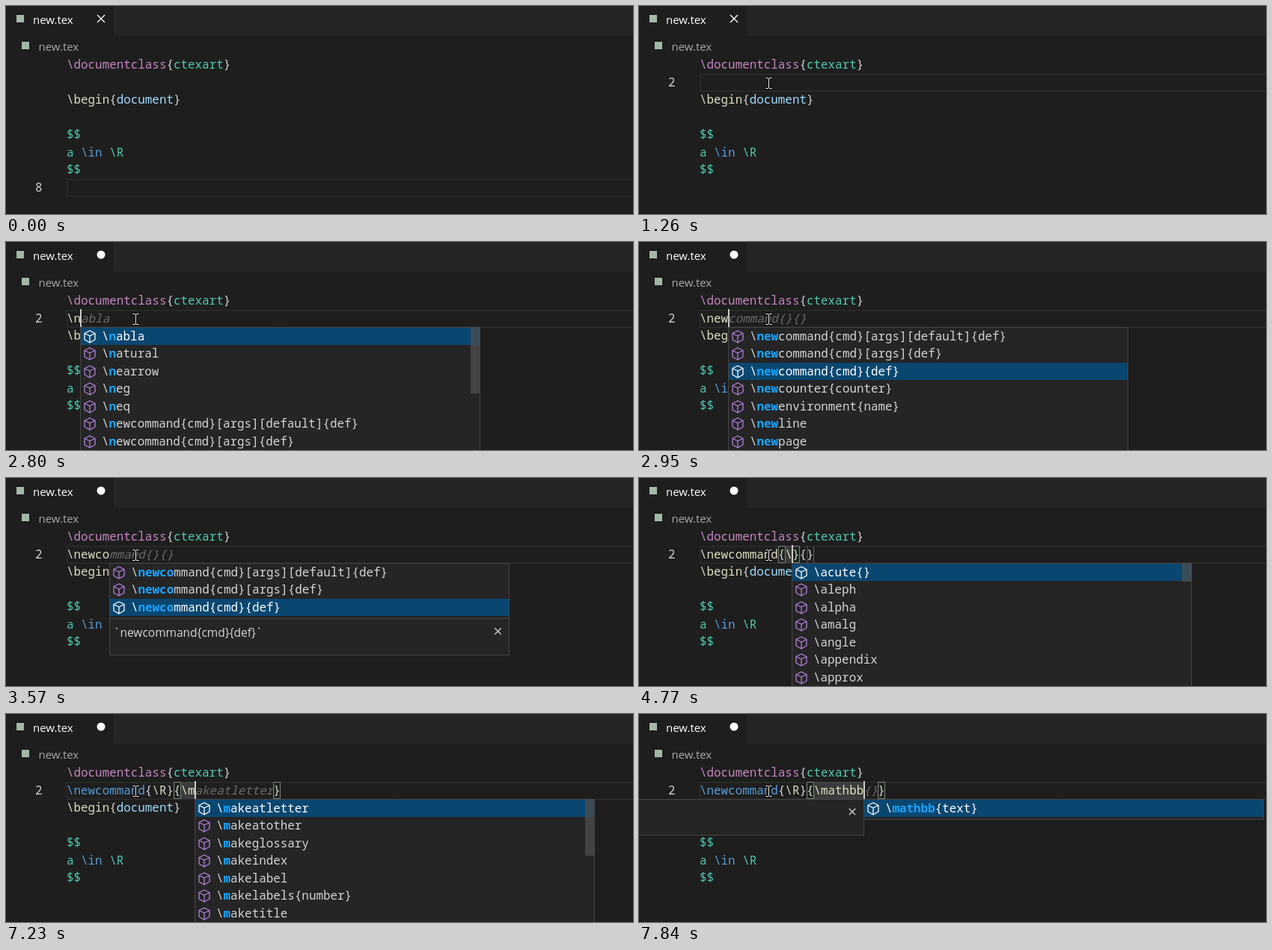
Write an HTML page with a canvas that moves like this. It is 838 by 279 pixels and loops after 8000 ms.

```html
<!DOCTYPE html>
<html lang="en">
<head>
<meta charset="utf-8">
<title>Editor</title>
<style>
  html, body { margin: 0; width: 100%; height: 100%; overflow: hidden; background: #1e1e1e; }
  canvas { display: block; }
</style>
</head>
<body>
<canvas id="stage" width="838" height="279"></canvas>
<script>
const ctx = document.getElementById('stage').getContext('2d');
const W = 838, H = 279, LOOP = 8000;
const LEFT = 81, CHAR = 9.53, TOP = 67, ROW = 23.5;
const MONO = '15.88px "Noto Sans Mono", monospace';
const UI = '15px "Open Sans", sans-serif';
const DOC = '15.5px "Open Sans", sans-serif';
const C = {
  bg: '#1e1e1e', bar: '#252526', text: '#d4d4d4', cmd: '#dcdcc0', key: '#c586c0', cls: '#4ec9b0',
  arg: '#9cdcfe', blue: '#569cd6', ghost: '#6a6a6a', match: '#18a3ff', pick: '#094771',
  border: '#454545', icon: '#b180d7', mark: '#a3b8a6', caret: '#c8c8c6'
};

const DEFS = ['\\newcommand{cmd}[args][default]{def}', '\\newcommand{cmd}[args]{def}', '\\newcommand{cmd}{def}'];
const MATH = ['bb', 'bf', 'cal', 'it', 'rm', 'sf', 'tt'].map(s => `\\math${s}{text}`);
const cmds = s => s.split(' ').map(w => '\\' + w);
const LISTS = {
  all: { rows: cmds('acute{} aleph alpha amalg angle appendix approx'), bar: 25 },
  n: { rows: [...cmds('nabla natural nearrow neg neq'), DEFS[0], DEFS[1]], bar: 89 },
  ne: { rows: [...cmds('nearrow neg neq'), ...DEFS, '\\newcounter{counter}'], bar: 110 },
  new: { rows: [...DEFS, ...cmds('newcounter{counter} newenvironment{name} newline newpage')], pick: 2 },
  def: { rows: DEFS, pick: 2, doc: 'below' },
  R: { rows: cmds('R Re Rightarrow rangle rceil ref{} rfloor'), bar: 25 },
  m: { rows: cmds('makeatletter makeatother makeglossary makeindex makelabel makelabels{number} maketitle'), bar: 76 },
  math: { rows: MATH, doc: 'left' },
  mathb: { rows: MATH.slice(0, 2), doc: 'left' },
  bb: { rows: MATH.slice(0, 1), doc: 'left' }
};

// Each step overrides the state before it; "slot" is where the caret sits.
const STEPS = [
  [0, { slot: 0, typed: ['', '', ''], ghost: '', list: '', done: false, blue: false, pair: 0 }],
  [2040, { typed: ['\\', '', ''] }],
  [2140, { list: 'all' }],
  [2750, { typed: ['\\n', '', ''] }],
  [2800, { list: 'n', ghost: 'abla' }],
  [2850, { typed: ['\\ne', '', ''], list: 'ne', ghost: 'arrow' }],
  [2950, { typed: ['\\new', '', ''], list: 'new', ghost: 'command{}{}' }],
  [3160, { typed: ['\\newc', '', ''], list: 'def', ghost: 'ommand{}{}' }],
  [3210, { typed: ['\\newco', '', ''], ghost: 'mmand{}{}' }],
  [3780, { typed: ['\\newcommand', '', ''], slot: 1, done: true, list: '', ghost: '' }],
  [3830, { pair: 1 }],
  [4720, { typed: ['\\newcommand', '\\', ''] }],
  [4770, { list: 'all' }],
  [4820, { blue: true }],
  [5080, { typed: ['\\newcommand', '\\R', ''], list: 'R' }],
  [5740, { list: '' }],
  [5840, { slot: 2 }],
  [6100, { pair: 2 }],
  [6620, { typed: ['\\newcommand', '\\R', '\\'] }],
  [6670, { list: 'all' }],
  [7230, { typed: ['\\newcommand', '\\R', '\\m'], list: 'm', ghost: 'akeatletter' }],
  [7280, { typed: ['\\newcommand', '\\R', '\\ma'], ghost: 'keatletter' }],
  [7380, { typed: ['\\newcommand', '\\R', '\\mat'], list: 'math', ghost: 'hbb{}' }],
  [7530, { typed: ['\\newcommand', '\\R', '\\math'], ghost: 'bb{}' }],
  [7740, { typed: ['\\newcommand', '\\R', '\\mathb'], list: 'mathb', ghost: 'b{}' }],
  [7840, { typed: ['\\newcommand', '\\R', '\\mathbb'], list: 'bb', ghost: '{}' }]
];
const CARET_OFF = [[0, 900], [1260, 1680], [2550, 2750], [3570, 3780], [4140, 4560], [5440, 5840], [6100, 6460], [6980, 7230]];
const FADES = [[2550, 2750], [5440, 5740]];

const within = (t, spans) => spans.find(([a, b]) => t >= a && t < b);
const colX = col => LEFT + col * CHAR;
const snapX = col => Math.floor(colX(col) - .1);
const stateAt = t => Object.assign({}, ...STEPS.filter(s => s[0] <= t).map(s => s[1]));

function rect(x, y, w, h, color) {
  ctx.fillStyle = color;
  ctx.fillRect(x, y, w, h);
}

function frame(x, y, w, h, color) {
  ctx.strokeStyle = color;
  ctx.lineWidth = 1;
  ctx.strokeRect(x + .5, y + .5, w - 1, h - 1);
}

function label(s, x, y, color, font = UI) {
  ctx.font = font;
  ctx.fillStyle = color;
  ctx.fillText(s, x, y);
}

// Draws [text, colour, font style] runs on the character grid.
function runs(parts, x, y) {
  for (const [s, color, style = ''] of parts) {
    [...s].forEach((ch, i) => label(ch, x + i * CHAR, y, color, `${style} ${MONO}`));
    x += s.length * CHAR;
  }
}

const codeLine = (n, parts) => runs(parts, LEFT, TOP + (n - 1) * ROW + 17);

function cross(x, y, r, color) {
  ctx.strokeStyle = color;
  ctx.lineWidth = 1.4;
  ctx.beginPath();
  ctx.moveTo(x - r, y - r); ctx.lineTo(x + r, y + r);
  ctx.moveTo(x + r, y - r); ctx.lineTo(x - r, y + r);
  ctx.stroke();
}

function cube(x, y, color) {
  ctx.strokeStyle = color;
  ctx.lineWidth = 1.3;
  ctx.lineJoin = 'round';
  ctx.beginPath();
  ctx.moveTo(x, y - 8);
  ctx.lineTo(x + 7, y - 4.5); ctx.lineTo(x + 7, y + 4); ctx.lineTo(x, y + 8);
  ctx.lineTo(x - 7, y + 4); ctx.lineTo(x - 7, y - 4.5);
  ctx.closePath();
  ctx.moveTo(x - 7, y - 4.5); ctx.lineTo(x, y - 1); ctx.lineTo(x + 7, y - 4.5);
  ctx.moveTo(x, y - 1); ctx.lineTo(x, y + 8);
  ctx.stroke();
}

function header(dirty) {
  rect(144, 0, W - 144, 40, C.bar);
  rect(14, 12, 10, 10, C.mark);
  label('new.tex', 36, 24, '#ffffff');
  if (dirty) {
    ctx.fillStyle = '#ffffff';
    ctx.beginPath();
    ctx.arc(127, 17, 5.5, 0, 7);
    ctx.fill();
  } else cross(127, 17, 5, '#ffffff');
  rect(21, 48, 10, 10, C.mark);
  label('new.tex', 43.5, 60, '#a9a9a9');
}

function currentLine(n, showNumber) {
  const y = Math.round(TOP + (n - 1) * ROW);
  ctx.strokeStyle = '#2c2c2c';
  ctx.lineWidth = 1.5;
  ctx.strokeRect(LEFT + .75, y + .75, W, 22.5);
  if (showNumber) label(String(n), 39, TOP + (n - 1) * ROW + 17, '#d0d0d0', MONO);
}

function bracketBox(col) {
  const x = Math.round(colX(col));
  rect(x, 91, 10, 23, 'rgba(0,100,0,.1)');
  frame(x, 91, 10, 23, '#808080');
}

// The line being typed; returns the caret column.
function commandLine(s) {
  const [cmd, a, b] = s.typed;
  const ghost = i => [s.slot === i ? s.ghost : '', C.ghost, 'italic'];
  if (!s.done) {
    codeLine(2, [[cmd, C.cmd], ghost(0)]);
    return cmd.length;
  }
  const open1 = cmd.length, close1 = open1 + 1 + a.length;
  const open2 = close1 + 1, start2 = open2 + 1, end2 = start2 + b.length;
  const close2 = end2 + (s.slot === 2 ? s.ghost.length : 0);
  const active = s.slot === 1 ? [open1 + 1, a.length] : [start2, b.length];
  rect(colX(active[0]), 91, Math.max(2, active[1] * CHAR), 23, 'rgba(124,124,124,.3)');
  if (!b) {
    rect(Math.round(colX(start2)), 91, 2, 23, 'rgba(124,124,124,.3)');
    rect(Math.round(colX(close2 + 1)), 91, 1, 23, '#626262');
  }
  if (s.pair === 1) [open1, close1].forEach(bracketBox);
  if (s.pair === 2) [open2, close2].forEach(bracketBox);
  codeLine(2, [
    [cmd, s.blue ? C.blue : C.cmd], ['{', C.text], [a, C.cmd], ['}{', C.text],
    [b, C.cmd], ghost(2), ['}', C.text]
  ]);
  return s.slot === 1 ? close1 : end2;
}

function panel(x, y, w, h) {
  rect(x, y, w, h, C.bar);
  frame(x, y, w, h, C.border);
}

function popup(s, col, barAlpha) {
  const list = LISTS[s.list], x = snapX(col), w = 535, top = 114;
  const typed = s.typed[s.slot].length, pick = list.pick || 0;
  panel(x, top, w, Math.round(list.rows.length * ROW + 4));
  list.rows.forEach((row, i) => {
    const y = Math.round(top + .5 + i * ROW), on = i === pick;
    if (on) rect(x + 1, y, w - 2, 23, C.pick);
    cube(x + 13, y + 12, on ? '#ffffff' : C.icon);
    const color = on ? '#ffffff' : C.text;
    runs([
      ['\\', color, '500'], [row.slice(1, typed), C.match, 'bold'], [row.slice(typed), color, '500']
    ], x + 29, y + 17);
  });
  if (list.bar) rect(x + w - 13, top, 12, list.bar, `rgba(78,78,78,${.75 * barAlpha})`);
  if (list.doc === 'below') {
    panel(x, 188, w, 50);
    label('`newcommand{cmd}{def}`', x + 5.5, 212.5, C.text, DOC);
    cross(x + 519.5, 205.5, 4.2, '#cccccc');
  } else if (list.doc === 'left') {
    panel(-4, top, x + 5, 49);
    cross(x - 15, 131, 4.2, '#cccccc');
  }
}

function pointer(t) {
  if (t < 50) return;
  let x = 173, y = 103;
  if (t < 950) {
    const p = 1 - (1 - (t - 50) / 900) ** 2;
    x = 226 - 53 * p;
    y = 283 - 180 * p;
  }
  x = Math.round(x);
  y = Math.round(y);
  rect(x - 5, y - 8, 11, 3, '#000000');
  rect(x - 5, y + 6, 11, 3, '#000000');
  rect(x - 1, y - 7, 3, 15, '#000000');
  rect(x, y - 6, 1, 13, '#ffffff');
  for (const dy of [-7, 7]) {
    rect(x - 4, y + dy, 4, 1, '#ffffff');
    rect(x + 1, y + dy, 4, 1, '#ffffff');
  }
}

function draw(t) {
  const s = stateAt(t), clicked = t >= 850;
  rect(0, 0, W, H, C.bg);
  header(t >= 2040);
  currentLine(clicked ? 2 : 8, t < 850 || t >= 900);

  codeLine(1, [['\\documentclass', C.key], ['{', C.text], ['ctexart', C.cls], ['}', C.text]]);
  codeLine(3, [['\\begin', C.cmd], ['{', C.text], ['document', C.arg], ['}', C.text]]);
  codeLine(5, [['$$', C.cls]]);
  codeLine(6, [['a ', C.cls], ['\\in', C.blue], [' \\R', C.cls]]);
  codeLine(7, [['$$', C.cls]]);

  const col = commandLine(s);
  if (!within(t, CARET_OFF)) rect(snapX(col), 90, 2, 24, C.caret);
  const fade = within(t, FADES);
  if (s.list) popup(s, col, !fade ? 1 : t < fade[0] + 50 ? .5 : 0);
  pointer(t);
}

const start = performance.now();
function tick() {
  draw((performance.now() - start) % LOOP);
  requestAnimationFrame(tick);
}
tick();
</script>
</body>
</html>
```
